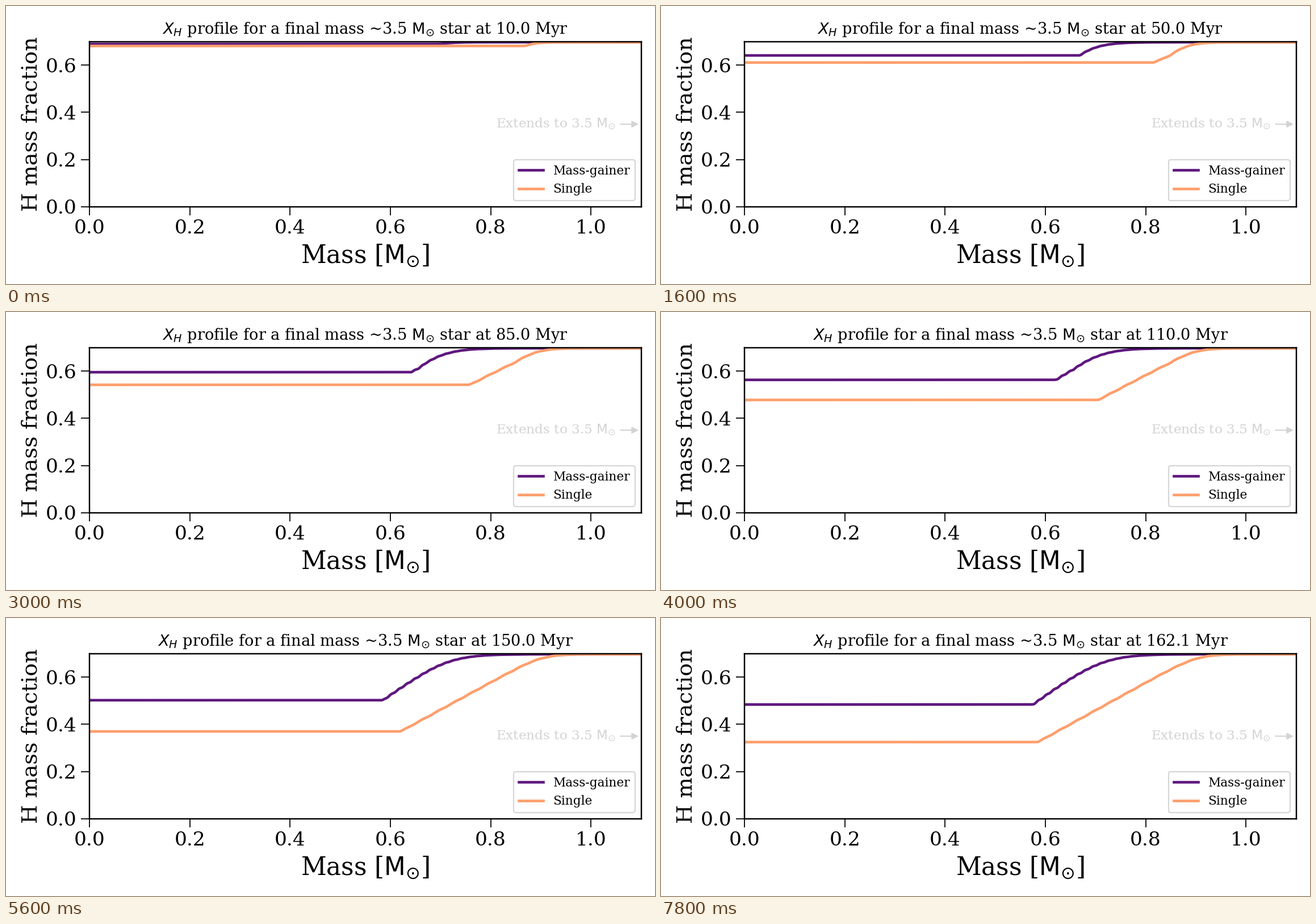
Recreate the animation shown at these times as a matplotlib script. Size 1143 by 490 pixels, loop 8 s.

```python
import numpy as np
import matplotlib.pyplot as plt
from matplotlib.animation import FuncAnimation

W, H, DPI = 1143, 490, 160
FRAMES, INTERVAL = 40, 200
T_END = 162
SURFACE = 0.697  # unprocessed hydrogen fraction
SUN = r"$\rm M_{\odot}$"

plt.rcParams.update({
    "font.family": "DejaVu Serif",
    "mathtext.fontset": "dejavusans",
    "axes.linewidth": 1.1,
})

mass = np.linspace(0, 1.15, 1151)


def softplus(x, width):
    return width * np.logaddexp(0, x / width)


class Star:
    """Flat core below a gradient that the shrinking core leaves behind."""

    def __init__(self, label, color, core, slope, edge, width, ripple, delay):
        self.label, self.color = label, color
        self.ages, self.core = zip(*core)
        size, period, peak = ripple
        fade = 1 / (1 + np.exp((mass - edge) / width))
        waves = size * fade * np.cos(2 * np.pi * (mass - peak) / period)
        self.deficit = slope * softplus(edge - mass, width) - waves
        # outer layers are mixed later than those next to the core
        floor, rate, start = delay
        self.delay = np.maximum(floor, rate * (mass - start))

    def profile(self, t):
        plateau = np.interp(t, self.ages, self.core)
        outer = SURFACE - self.deficit * (t / T_END) ** self.delay
        return plateau + softplus(outer - plateau, 0.0015)


stars = [
    Star("Mass-gainer", "#5f187f",
         core=[(10, 0.6895), (50, 0.641), (110, 0.563), (162, 0.484)],
         slope=1.55, edge=0.712, width=0.035,
         ripple=(0.0018, 0.0155, 0.679), delay=(0.2, 10.2, 0.638)),
    Star("Single", "#fe9f6d",
         core=[(10, 0.681), (50, 0.611), (85, 0.542), (110, 0.478),
               (130, 0.430), (150, 0.370), (162, 0.325)],
         slope=1.17, edge=0.903, width=0.022,
         ripple=(0.0012, 0.033, 0.8265), delay=(0.14, 12, 0.839)),
]


def age(i):
    """Steps of 5 Myr, then very short steps near the end."""
    return 10 + 5 * i if i <= 30 else 162.005 + 0.01 * (i - 31)


fig = plt.figure(figsize=(W / DPI, H / DPI), dpi=DPI, facecolor="white")
left, right, top, bottom = 147, 1118.6, 62.6, 354
ax = fig.add_axes([left / W, 1 - bottom / H,
                   (right - left) / W, (bottom - top) / H])
ax.set(xlim=(0, 1.1), ylim=(0, 0.7),
       xticks=np.arange(6) * 0.2, yticks=np.arange(4) * 0.2)
ax.tick_params(labelsize=15.5, length=6.6, width=0.8, pad=3.5)
ax.set_xlabel(f"Mass [{SUN}]", fontsize=19.7)
ax.set_ylabel("H mass fraction", fontsize=17.2, labelpad=3.2)
title = ax.set_title("", fontsize=12.27, pad=6)

lines = [ax.plot([], [], color=s.color, lw=2.1, label=s.label)[0]
         for s in stars]
ax.legend(loc="lower right", fontsize=9.75)
ax.annotate(f"Extends to 3.5 {SUN}", xy=(1.1, 0.35),
            xytext=(0.9295, 0.35), ha="center", va="center",
            fontsize=10.4, color="lightgrey",
            arrowprops=dict(arrowstyle="-|>", color="lightgrey"))


def draw(i):
    t = age(i)
    for line, star in zip(lines, stars):
        line.set_data(mass, star.profile(t))
    title.set_text(f"$X_H$ profile for a final mass ~3.5 {SUN} "
                   f"star at {t:.1f} Myr")
    return [*lines, title]


anim = FuncAnimation(fig, draw, frames=FRAMES, interval=INTERVAL,
                     repeat=True, repeat_delay=0)
plt.show()
```
